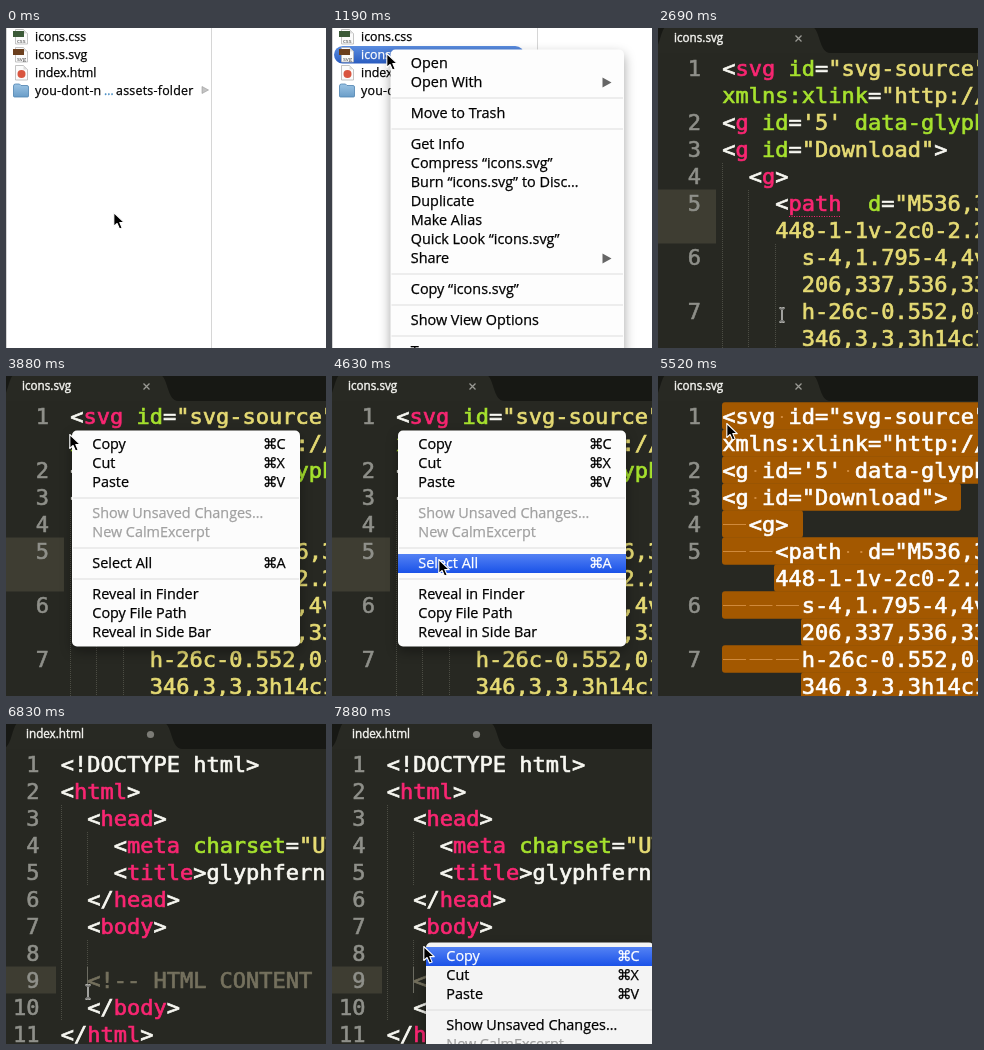
An HTML page that plays this animation: 320x320 px, repeating every 8000 ms.

```html
<!DOCTYPE html>
<html lang="en">
<head>
<meta charset="utf-8">
<title>Copying an icon file</title>
<style>
html, body { margin: 0; width: 100%; height: 100%; overflow: hidden; background: #fff; }
svg { display: block; width: 100vw; height: 100vh; }
text { white-space: pre; font-family: "Open Sans", "DejaVu Sans", sans-serif; }
.file { font-size: 12.4px; fill: var(--c, #000); stroke: var(--c, #000); stroke-width: .25; }
.tab { font-size: 11.7px; fill: #f4f4f0; stroke: #f4f4f0; stroke-width: .4; }
.code, .num { font: 22px "DejaVu Sans Mono", monospace; }
.num { fill: #8f908a; text-anchor: end; stroke: #8f908a; stroke-width: .6; }
.code tspan { fill: var(--c); stroke: var(--c); stroke-width: .7; }
.w { --c: #f8f8f2; } .p { --c: #f92672; } .g { --c: #a6e22e; }
.y { --c: #e6db74; } .c { --c: #75715e; }
.sel tspan { --c: #fff; }
.marked { display: none; }
.sel .marked { display: inline; }
.sel .unmarked { display: none; }
.row { --c: #000; font-size: 14.4px; }
.row text { fill: var(--c); stroke: var(--c); stroke-width: .25; }
.row.off { --c: #a0a0a0; }
.row rect { fill: url(#blue); visibility: hidden; }
.row.on { --c: #fff; }
.row.on rect { visibility: visible; }
.sheet { filter: drop-shadow(0 5px 6px rgba(0, 0, 0, .36)); }
</style>
</head>
<body>
<svg id="stage" viewBox="0 0 320 320">
  <defs>
    <linearGradient id="blue" x2="0" y2="1">
      <stop stop-color="#5482f4"/><stop offset="1" stop-color="#1a52e8"/>
    </linearGradient>
    <linearGradient id="pick" x2="0" y2="1">
      <stop stop-color="#5b8de0"/><stop offset="1" stop-color="#2a5cc0"/>
    </linearGradient>
    <linearGradient id="folder" x2="0" y2="1">
      <stop stop-color="#9cc4e4"/><stop offset="1" stop-color="#6a9dc8"/>
    </linearGradient>
  </defs>
</svg>
<script>
const LOOP = 8000, LINE = 27, CHAR = 13.24;
const stage = document.getElementById('stage');

function add(parent, tag, attrs = {}, text) {
  const el = document.createElementNS('http://www.w3.org/2000/svg', tag);
  for (const k in attrs) el.setAttribute(k, attrs[k]);
  if (text !== undefined) el.textContent = text;
  return parent.appendChild(el);
}
const group = (parent, attrs) => add(parent, 'g', attrs);
const rect = (parent, x, y, width, height, fill, rx = 0) =>
  add(parent, 'rect', { x, y, width, height, fill, rx });
const path = (parent, d, fill, more = {}) => add(parent, 'path', { d, fill, ...more });
const display = (el, on) => { el.style.display = on ? '' : 'none'; };
const mid = row => 40 + LINE * row;

// ---- file browser ----
const files = group(stage);
rect(files, 0, 0, 320, 320, '#fff');
rect(files, 0, 0, 1, 320, '#d4d4d4');
rect(files, 205, 0, 1, 320, '#d6d6d6');
const pick = rect(files, 2, 18, 190, 17.5, 'url(#pick)', 8.7);

function paper(y) {
  path(files, `M9.5 ${y + .5}h8l4 4v10.5h-12z`, '#fbfbfb', { stroke: '#b4b4b4', 'stroke-width': .8 });
  path(files, `M17.5 ${y + .5}v4h4z`, '#ddd');
}
function badge(y, color, label) {
  paper(y);
  rect(files, 7, y + 2, 11, 6, color);
  add(files, 'text', { x: 11, y: y + 13.5, 'font-size': 6, fill: '#444' }, label);
}
badge(1, '#3c5a38', 'css');
badge(19, '#6b3f1e', 'svg');
paper(37);
add(files, 'circle', { cx: 15.5, cy: 46, r: 4, fill: '#d9553f' });
path(files, 'M7.5 58q0-2 2-2h4l1.500 1.500h6q1.500 0 1.500 1.500v9q0 1-1 1h-13q-1 0-1-1z',
  'url(#folder)', { stroke: '#4f83b0', 'stroke-width': .8 });
path(files, 'M196 58.500l6.500 3.500-6.500 3.500z', '#c4c4c4', { stroke: '#999', 'stroke-width': .6 });

const names = ['icons.css', 'icons.svg', 'index.html'].map((name, i) =>
  add(files, 'text', { class: 'file', x: 29, y: 13 + 18 * i }, name));
[[29, 'you-dont-n', '#000'], [98, '…', '#3a86c0'], [110, 'assets-folder', '#000']].forEach(([x, s, color]) =>
  add(files, 'text', { class: 'file', x, y: 67, style: `--c: ${color}`, 'letter-spacing': .25 }, s));

// ---- code editor ----
function editor(title, shift) {
  const g = group(stage);
  rect(g, 0, 0, 320, 320, '#272822');
  rect(g, 0, 0, 320, 25, '#171814');
  path(group(g, { transform: `translate(${shift})` }),
    'M-8 25C2 25 2 0 8-1H154C162 0 161 25 172 25Z', '#282923');
  add(g, 'text', { class: 'tab', x: 16 + shift, y: 14 }, title);
  return g;
}
// Each part is a colour letter followed by its text.
function code(g, x, row, parts) {
  const t = add(g, 'text', { class: 'code', x, y: mid(row) + 8 });
  parts.split('|').forEach(p => add(t, 'tspan', { class: p[0] }, p.slice(1)));
}
const number = (g, x, row, n) => add(g, 'text', { class: 'num', x, y: mid(row) + 8 }, n);
const guide = (g, x, from, to) => path(g, `M${x + .5} ${mid(from) - 13}V${mid(to) + 13}`, 'none',
  { stroke: '#4c4d44', 'stroke-dasharray': '1 1' });

const icons = editor('icons.svg', 0);
path(icons, 'M137.500 7.500l6 6m0-6l-6 6', 'none', { stroke: '#9a9a94', 'stroke-width': 1.3 });
const plain = group(icons, { class: 'unmarked' });
rect(plain, 0, mid(5) - 13.5, 58, LINE * 2, '#3e3d32');
guide(plain, 64, 4, 10);
guide(plain, 90, 5, 10);
guide(plain, 117, 7, 10);
path(plain, 'M131 188.500H183', 'none', { stroke: '#f92672', 'stroke-dasharray': '1 1.500' });

const marked = group(icons, { class: 'marked' });
[[64, 330], [64, 330], [64, 330], [64, 303], [64, 145], [64, 330],
 [116, 330], [64, 330], [143, 330], [64, 330], [143, 330]].forEach(([a, b], row) =>
  rect(marked, a, mid(row) - 13.7, b - a, LINE + .4, '#a35800', 3));

const lines = [
  [1, 0, 'w<|psvg|g id|w=|y"svg-source"'],
  ['', 0, 'gxmlns:xlink|w=|y"http://'],
  [2, 0, "w<|pg|g id|w=|y'5'|g data-glyphfern"],
  [3, 0, 'w<|pg|g id|w=|y"Download"|w>'],
  [4, 2, 'w<|pg|w>'],
  [5, 4, 'w<|ppath|g  d|w=|y"M536,337'],
  ['', 4, 'y448-1-1v-2c0-2.206'],
  [6, 6, 'ys-4,1.795-4,4v1'],
  ['', 6, 'y206,337,536,337'],
  [7, 6, 'yh-26c-0.552,0-1'],
  ['', 6, 'y346,3,3,3h14c1.6']
];
lines.forEach(([n, indent, parts], row) => {
  const x = 64.3 + indent * CHAR;
  number(icons, 43, row, n);
  code(icons, x, row, parts);
  const marks = group(icons, { class: 'marked' });
  if (n) for (let i = 0; i < indent; i += 2)
    rect(marks, 65 + i * CHAR, mid(row), 23, 1, '#d08a3c');
  const text = parts.split('|').map(p => p.slice(1)).join('');
  [...text].forEach((ch, i) => {
    if (ch === ' ') rect(marks, x + (i + .5) * CHAR - 1, mid(row), 2, 2, '#d08a3c');
  });
});

const page = editor('index.html', 4);
add(page, 'circle', { cx: 144.5, cy: 10.5, r: 3.6, fill: '#7c7c76' });
rect(page, 0, mid(8) - 13.5, 50, LINE, '#3e3d32');
guide(page, 55, 2, 9);
guide(page, 81, 3, 4);
guide(page, 81, 7, 8);
rect(page, 81, mid(8) - 13, 1, LINE - 1, '#6c6c62');
const tag = (name, close = '') => `w<${close}|p${name}|w>`;
[
  [0, 'w<!DOCTYPE html>'],
  [0, tag('html')],
  [2, tag('head')],
  [4, 'w<|pmeta|g charset|w=|y"UTF-8"'],
  [4, tag('title') + 'glyphfern'],
  [2, tag('head', '/')],
  [2, tag('body')],
  [0, 'w'],
  [2, 'c<!-- HTML CONTENT -->'],
  [2, tag('body', '/')],
  [0, tag('html', '/')]
].forEach(([indent, parts], row) => {
  number(page, 33.5, row, row + 1);
  code(page, 54.7 + indent * CHAR, row, parts);
});

// ---- context menus, drawn from their own top left corner ----
// '-' is a divider, a leading '~' is disabled, '>' opens a submenu.
function menu(width, fill, items) {
  const g = group(stage), rows = [];
  const sheet = add(g, 'rect', { class: 'sheet', width, fill, rx: 5 });
  let y = 4.5;
  items.forEach(item => {
    if (item === '-') {
      rect(g, 1, y + 5.5, width - 2, 1, '#dedede');
      y += 12;
      return;
    }
    const [label, key] = item.replace('~', '').split('|');
    const r = group(g, { class: item[0] === '~' ? 'row off' : 'row' });
    add(r, 'rect', { x: 0, y, width, height: 19 });
    add(r, 'text', { x: 20.3, y: y + 14.3 }, label);
    if (key === '>') path(r, `M212 ${y + 4.5}l9 5-9 5z`, '#666');
    else if (key) {
      add(r, 'text', { x: 191, y: y + 14.3 }, '⌘');
      add(r, 'text', { x: 204.5, y: y + 14.3 }, key);
    }
    rows.push(r);
    y += 19;
  });
  sheet.setAttribute('height', y + 4.5);
  return { g, rows };
}
const editItems = unsaved => ['Copy|C', 'Cut|X', 'Paste|V', '-', unsaved, '~New CalmExcerpt', '-',
  'Select All|A', '-', 'Reveal in Finder', 'Copy File Path', 'Reveal in Side Bar'];
const fileMenu = menu(233.5, '#fdfdfd', ['Open', 'Open With|>', '-', 'Move to Trash', '-', 'Get Info',
  'Compress “icons.svg”', 'Burn “icons.svg” to Disc…', 'Duplicate', 'Make Alias',
  'Quick Look “icons.svg”', 'Share|>', '-', 'Copy “icons.svg”', '-', 'Show View Options', '-', 'Tags']);
const iconMenu = menu(228, '#fcfcfc', editItems('~Show Unsaved Changes…'));
const pageMenu = menu(228, '#f4f4f4', editItems('Show Unsaved Changes…'));

// ---- pointers ----
const arrow = group(stage);
path(arrow, 'M-.2 .5V14.500L3.100 11.500 5.500 17 8.100 15.900 5.800 10.600H10.300Z', '#000',
  { stroke: '#fff', 'stroke-width': 1.1, 'stroke-linejoin': 'round' });
const beam = group(stage);
[['#f0f0ec', 1.9], ['#222', .7]].forEach(([stroke, w]) =>
  path(beam, 'M-2.500-7Q0-7 0-5Q0-7 2.500-7M0-5V5M-2.500 7Q0 7 0 5Q0 7 2.500 7',
    'none', { stroke, 'stroke-width': w }));

// Pointer moves: start, step count, end x, end y, step length.
const moves = [
  [0, 1, 108, 184], [290, 4, 55, 25], [1340, 2, 63, 30], [2240, 4, 124, 287],
  [3140, 5, 64, 58], [4180, 4, 107, 183], [5380, 2, 69, 47, 140], [6120, 1, 71, 50],
  [6680, 2, 82, 268], [6980, 3, 91, 221], [7430, 1, 91, 219], [7880, 1, 92, 222]
];
const ease = p => p * p * (3 - 2 * p);
function pointer(t) {
  let x = 108, y = 184;
  for (const [at, n, tx, ty, step = 150] of moves) {
    if (t < at) break;
    const p = ease(Math.min(n, Math.floor((t - at) / step) + 1) / n);
    x += (tx - x) * p;
    y += (ty - y) * p;
  }
  return [x, y];
}

// Stage states: start, scene, menu, menu place, lit row, menu opacity.
const FILE = [58.5, 21.5], FIRST = [66, 54.5], SECOND = [70, 43.5], THIRD = [94, 218.5];
const states = [
  [0, 'files'],
  [1040, 'picked'],
  [1190, 'picked', fileMenu, FILE, -1, 1],
  [1490, 'picked', fileMenu, FILE, 0, 1],
  [2090, 'picked', fileMenu, FILE, 0, .92],
  [2240, 'picked'],
  [2540, 'icons'],
  [3880, 'icons', iconMenu, FIRST, -1, 1],
  [4180, 'icons', iconMenu, FIRST, 0, 1],
  [4330, 'icons', iconMenu, FIRST, 2, 1],
  [4480, 'icons', iconMenu, FIRST, -1, 1],
  [4630, 'icons', iconMenu, FIRST, 5, 1],
  [5230, 'icons', iconMenu, FIRST, 5, .92],
  [5380, 'selected'],
  [5820, 'selected', iconMenu, SECOND, -1, 1],
  [6120, 'selected', iconMenu, SECOND, 0, 1],
  [6260, 'selected', iconMenu, SECOND, 0, .92],
  [6680, 'selected'],
  [6830, 'page'],
  [7430, 'page', pageMenu, THIRD, -1, 1],
  [7880, 'page', pageMenu, THIRD, 0, 1]
];

function draw(t) {
  const [, scene, open, place, lit, alpha] = states.filter(s => s[0] <= t).pop();
  const picked = scene === 'picked', selected = scene === 'selected';
  display(files, picked || scene === 'files');
  display(icons, selected || scene === 'icons');
  display(page, scene === 'page');
  display(pick, picked);
  names[1].style.setProperty('--c', picked ? '#fff' : '#000');
  icons.setAttribute('class', selected ? 'sel' : '');

  for (const m of [fileMenu, iconMenu, pageMenu]) {
    display(m.g, m === open);
    if (m !== open) continue;
    m.g.setAttribute('transform', `translate(${place})`);
    m.g.setAttribute('opacity', alpha);
    m.rows.forEach((r, i) => r.classList.toggle('on', i === lit));
  }

  const typing = (t >= 2540 && t < 3740) || (t >= 6680 && t < 7430);
  const at = `translate(${pointer(t)})`;
  arrow.setAttribute('transform', at);
  beam.setAttribute('transform', at);
  display(arrow, !typing);
  display(beam, typing);
}

const start = performance.now();
function tick() {
  draw((performance.now() - start) % LOOP);
  requestAnimationFrame(tick);
}
tick();
</script>
</body>
</html>
```
